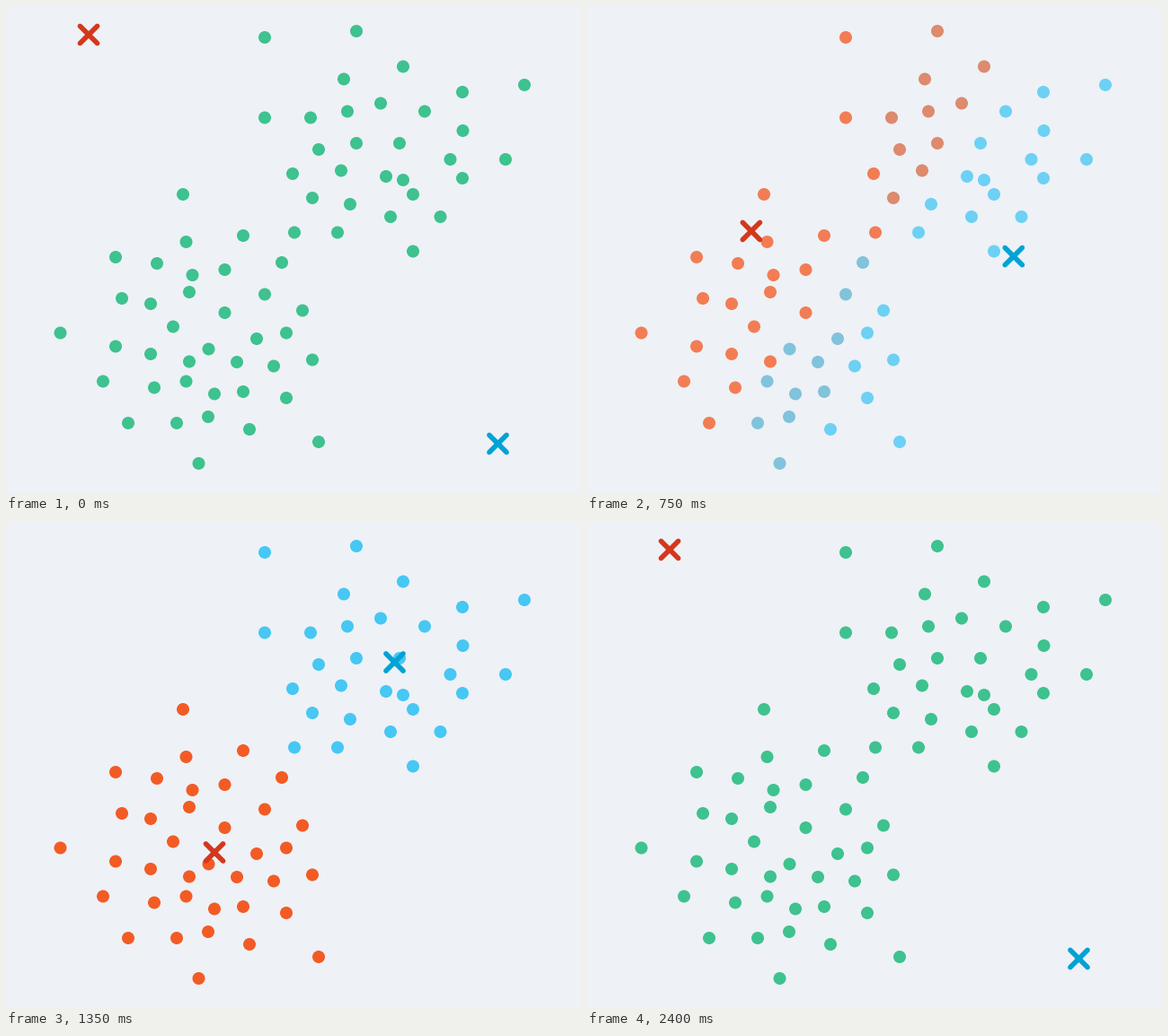
These frames come from a looping animation (640 px wide and 543 px high, 2.64 s). A matplotlib script:

```python
import numpy as np
import matplotlib.pyplot as plt
from matplotlib.animation import FuncAnimation
from matplotlib.colors import to_rgb

W, H, DPI = 640, 543, 100
STEP, FRAMES = 30, 88
PX = 72 / DPI

BG = np.array(to_rgb("#EEF1F6"))
GREEN = to_rgb("#3EC28F")
DOT = {"O": to_rgb("#F35B24"), "B": to_rgb("#46C7F4")}

# Dots keyed by their cluster (orange / blue) in the three assignment rounds
GROUPS = {
    "OOO": [(197, 210), (200.5, 263), (264, 256), (122, 280), (168, 287),
            (243.5, 294), (207.5, 300), (129, 326), (161, 332), (204, 319),
            (243.5, 342), (186, 357.5), (60.5, 364.5), (122, 379.5),
            (161, 388), (204, 396.5), (108, 418.5), (165, 425.5), (136, 465)],
    "BOO": [(307, 286), (288, 321.5), (279, 371), (225.5, 382.5),
            (257, 397), (200.5, 418.5), (232, 432.5), (264, 430),
            (190, 465), (225, 458), (214.5, 510)],
    "BBO": [(330, 339.5), (312, 364.5), (298, 401.5), (341, 394.5),
            (312, 437), (271, 472), (348, 486)],
    "OOB": [(288, 35), (288, 124.5), (319, 187), (321, 252.5)],
    "OBB": [(390, 28), (442, 67.5), (376, 81.5), (417, 108.5), (380, 117.5),
            (339, 124.5), (390, 153), (348, 160), (373, 183.5), (341, 214)],
    "BBB": [(508, 96), (577, 88), (466, 117.5), (508.5, 139), (438, 153),
            (494.5, 171), (556, 171), (423, 190), (442, 194), (508, 192),
            (453, 210), (383, 221), (428, 235), (483.5, 235), (369, 252.5),
            (453, 273.5)],
}

# Centroid stops: start, then after each update
RED = np.array([(92, 32), (145, 159.3), (187, 261), (232, 369.5)])
BLUE = np.array([(547.5, 488), (509.6, 378.7), (471, 268.2), (432.5, 157.5)])

FADE = 300
FADE_STARTS = (0, 645, 1050)
MOVE, RESET, RESET_MOVE = 450, 2040, 360


def ramp(t, start, length):
    return min(max((t - start) / length, 0.0), 1.0)


def ease(u):
    return 8 * u**4 if u < 0.5 else 1 - 8 * (1 - u)**4


def centroid(stops, t):
    pos = stops[0].astype(float)
    for i, leg in enumerate(np.diff(stops, axis=0)):
        pos += leg * ease(ramp(t, i * MOVE, MOVE))
    return pos + (stops[0] - pos) * ease(ramp(t, RESET, RESET_MOVE))


points = np.array([p for group in GROUPS.values() for p in group])
keys = [k for k, group in GROUPS.items() for _ in group]
rounds = [np.array([DOT[k[i]] for k in keys]) for i in range(3)]
plain = np.tile(GREEN, (len(keys), 1))


def dot_colors(t):
    """Stack the colour layers, the earliest round on top."""
    a, b, c = (ramp(t, s, FADE) for s in FADE_STARTS)
    back = ramp(t, RESET, FADE)
    layers = [(rounds[2], c * (1 - back)),
              (rounds[1], b * (1 - c)),
              (rounds[0], a * (1 - b)),
              (plain, max(1 - a, back))]
    out = np.tile(BG, (len(keys), 1))
    for color, alpha in layers:
        out += (color - out) * alpha
    return out


fig = plt.figure(figsize=(W / DPI, H / DPI), dpi=DPI, facecolor=BG)
ax = fig.add_axes([0, 0, 1, 1])
ax.set(xlim=(0, W), ylim=(H, 0))
ax.axis("off")

dots = ax.scatter(*points.T, s=(14 * PX)**2, c=dot_colors(0), linewidths=0)


def cross(color):
    return ax.plot([], [], color=color, lw=5.6 * PX,
                   solid_capstyle="round", zorder=3)[0]


marks = [(cross("#D4381C"), RED), (cross("#00A3D4"), BLUE)]
ARM = 9.6
CROSS_X = ARM * np.array([-1, 1, np.nan, -1, 1])
CROSS_Y = ARM * np.array([-1, 1, np.nan, 1, -1])


def update(frame):
    t = frame * STEP
    dots.set_facecolors(dot_colors(t))
    for line, stops in marks:
        x, y = centroid(stops, t)
        line.set_data(x + CROSS_X, y + CROSS_Y)
    return [dots] + [line for line, _ in marks]


anim = FuncAnimation(fig, update, frames=FRAMES, interval=STEP,
                     repeat=True, repeat_delay=0)
plt.show()
```
